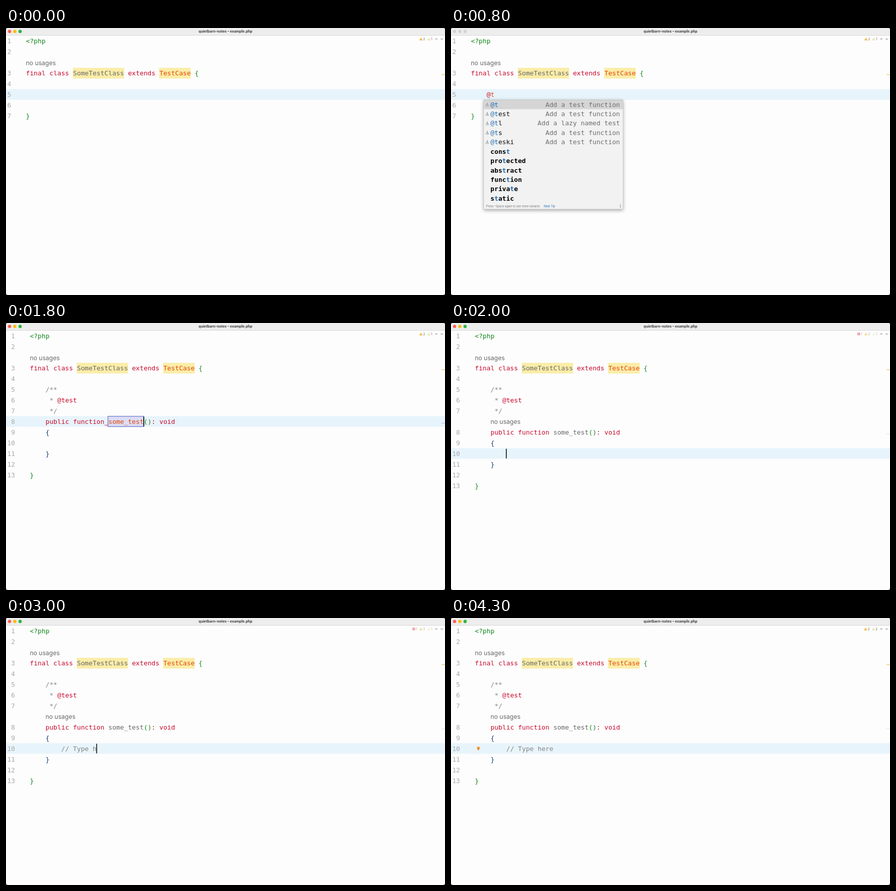
These frames come from a looping animation (860x524 px, 4.5 s). An HTML page with a canvas:

```html
<!DOCTYPE html>
<html lang="en">
<head>
<meta charset="utf-8">
<title>Editor</title>
<style>
html, body { margin: 0; width: 100%; height: 100%; overflow: hidden; background: #fdfdfd; }
canvas { display: block; width: 860px; height: 524px; }
</style>
</head>
<body>
<canvas id="stage"></canvas>
<script>
const W = 860, H = 524, LOOP = 4500;
const ROW = 20.95, TOP = 15.3, CHAR = 7.69;
const MONO = '"DejaVu Sans Mono", monospace', SANS = 'Inter, sans-serif';
const CODE = '12.78px ' + MONO, CODE_BOLD = 'bold ' + CODE, HINT = '12px ' + SANS;
const RED = '#c70a2c', ORANGE = '#e24808', GREEN = '#11871b', NAVY = '#113a78',
  GRAY = '#686868', COMMENT = '#858585', BLUE = '#1d6cb4', NUMBER = '#a9a9ac';

const canvas = document.getElementById('stage');
const ratio = window.devicePixelRatio || 1;
canvas.width = W * ratio;
canvas.height = H * ratio;
const ctx = canvas.getContext('2d');
ctx.scale(ratio, ratio);

const rowTop = row => TOP + row * ROW;

function rect(x, y, w, h, color) {
  ctx.fillStyle = color;
  ctx.fillRect(x, y, w, h);
}

function disc(x, y, r, color) {
  ctx.fillStyle = color;
  ctx.beginPath();
  ctx.arc(x, y, r, 0, 7);
  ctx.fill();
}

function line(points, color, width = 1) {
  ctx.strokeStyle = color;
  ctx.lineWidth = width;
  ctx.beginPath();
  points.forEach(([x, y]) => ctx.lineTo(x, y));
  ctx.stroke();
}

function text(str, x, y, color, font, align = 'left') {
  ctx.font = font;
  ctx.fillStyle = color;
  ctx.textAlign = align;
  ctx.fillText(str, x, y);
}

// Tokens alternate text and colour.
function code(row, x, ...tokens) {
  for (let i = 0; i < tokens.length; i += 2) {
    text(tokens[i], x, rowTop(row) + 15.1, tokens[i + 1], CODE);
    x += tokens[i].length * CHAR;
  }
}

function caret(x, row) {
  rect(x - 0.6, rowTop(row) + 1, 1.5, ROW - 2, '#000');
}

function titleBar(focused) {
  rect(0, 0, W, 14, '#ededed');
  rect(0, 14, W, 0.8, '#d3d3d3');
  ['#fe5f57', '#fdb912', '#29b43c'].forEach((color, i) =>
    disc(7 + i * 10.3, 6.7, 3.2, focused ? color : '#d3d3d3'));
  text('quietbarn-notes – example.php', W / 2, 9.1, '#3c3c3c', 'bold 6.9px ' + SANS, 'center');
}

function warning(x, count, color) {
  ctx.fillStyle = color;
  ctx.beginPath();
  ctx.moveTo(x, 24.3);
  ctx.lineTo(x + 3.3, 18.5);
  ctx.lineTo(x + 6.6, 24.3);
  ctx.fill();
  rect(x + 3, 20.5, 0.7, 2, '#fff');
  text(count, x + 7.6, 23.8, '#666', '6px ' + SANS);
}

function inspections(state) {
  ctx.globalAlpha = state === 'error' ? 0.5 : 1;
  if (state === 'error') {
    disc(798.8, 21.4, 3, '#dc5261');
    rect(798.4, 19.7, 0.8, 2.4, '#fff');
    text('1', 803, 23.8, '#666', '6px ' + SANS);
  }
  const shift = state === 'done' ? -0.8 : 0;
  warning(809.6 + shift, '2', '#edb83b');
  warning(825 + shift, state === 'done' ? '2' : '1', '#e9e3b4');
  ctx.globalAlpha = 1;
  line([[841, 22.6], [843, 20.4], [845, 22.6]], '#555', 0.9);
  line([[851.8, 20.6], [853.8, 22.8], [855.8, 20.6]], '#555', 0.9);
}

function classHeader(x) {
  rect(x + 12 * CHAR - 0.4, rowTop(3), 13 * CHAR + 0.6, ROW, '#fbeda8');
  rect(x + 34 * CHAR - 0.4, rowTop(3), 8 * CHAR + 0.4, ROW, '#fbeda8');
  code(0, x, '<?php', GREEN);
  text('no usages', x, rowTop(2) + 57 - 0.1 - 41.9 + 0.1 + 0.2, GRAY, HINT);
  code(3, x, 'final class ', RED, 'SomeTestClass', GRAY, ' extends ', RED,
    'TestCase', ORANGE, ' {', GREEN);
  rect(853, 91, 7, 1.1, '#e6c64f');
}

function lineNumbers(count, right, hintRows) {
  let row = 0;
  for (let n = 1; n <= count; n++, row++) {
    while (hintRows.includes(row)) row++;
    text(n, right, rowTop(row) + 15.1, NUMBER, CODE, 'right');
  }
}

function currentRow(row) {
  rect(0, rowTop(row) - 0.2, W, ROW, '#e8f4fb');
}

function stampIcon(y) {
  line([[71, y - 3.4], [71, y + 0.3]], '#999', 1.6);
  line([[68, y + 0.6], [74, y + 0.6]], '#999', 1);
  line([[67.8, y + 2.8], [74.2, y + 2.8]], '#999', 1);
}

const TEMPLATES = [['@t', 'Add a test function'], ['@test', 'Add a test function'],
  ['@tl', 'Add a lazy named test'], ['@ts', 'Add a test function'], ['@teski', 'Add a test function']];
const KEYWORDS = ['const', 'protected', 'abstract', 'function', 'private', 'static'];

function popup() {
  ctx.save();
  ctx.shadowColor = 'rgba(0,0,0,0.35)';
  ctx.shadowBlur = 7 * ratio;
  ctx.shadowOffsetY = 2 * ratio;
  rect(64, 141, 273, 214.5, '#f2f2f2');
  ctx.restore();
  rect(64, 141, 273, 18.3, '#d5d5d5');
  ctx.strokeStyle = '#c2c2c2';
  ctx.lineWidth = 0.7;
  ctx.strokeRect(64, 141, 273, 214.5);

  const baseline = i => 154.6 + i * 18.43;
  TEMPLATES.forEach(([name, note], i) => {
    const y = baseline(i);
    stampIcon(y - 4.3);
    text(name.slice(0, 2), 77.3, y, BLUE, CODE);
    text(name.slice(2), 77.3 + 2 * CHAR, y, '#111', CODE);
    text(note, 331, y, '#6e6e6e', CODE, 'right');
  });
  KEYWORDS.forEach((word, i) => {
    const y = baseline(i + TEMPLATES.length);
    const hit = word === 'const' ? 4 : word.indexOf('t');
    [...word].forEach((letter, k) =>
      text(letter, 77.3 + k * CHAR, y, k === hit ? BLUE : '#000', CODE_BOLD));
  });
  text('Press ^Space again to see more variants', 69, 351.6, '#777', '5.5px ' + SANS);
  text('Next Tip', 182, 351.6, BLUE, '5.5px ' + SANS);
  [347, 349.5, 352].forEach(y => disc(331.8, y, 0.7, '#555'));
}

function shortcutScene(t) {
  const x = 39;
  currentRow(5);
  classHeader(x);
  lineNumbers(7, 10.2, [2]);
  code(7, x, '}', GREEN);
  const typed = t < 500 ? 0 : t < 600 ? 1 : 2;
  const start = x + 4 * CHAR;
  if (typed > 0) code(5, start, '@', RED);
  if (typed > 1) code(5, start + CHAR, 't', ORANGE);
  if (t >= 300 && t < 700) caret(start + typed * CHAR, 5);
  inspections('start');
  if (t >= 700) popup();
}

function methodScene(t) {
  const x = 46.7, indent = x + 4 * CHAR;
  const naming = t < 1900;
  const hint = t >= 2000 ? 1 : 0;
  const head = 8 + hint, body = head + 2;
  const letters = t < 1100 ? 0 : Math.min(9, Math.floor(t / 100) - 9);
  const name = 'some_test'.slice(0, letters);
  const nameX = indent + 16 * CHAR;

  currentRow(naming ? head : body);
  classHeader(x);
  lineNumbers(13, 17.8, hint ? [2, 8] : [2]);
  code(5, indent, '/**', COMMENT);
  code(6, indent, ' * ', COMMENT, '@test', RED);
  code(7, indent, ' */', COMMENT);
  if (hint) text('no usages', indent, rowTop(8) + 15.3, GRAY, HINT);

  if (naming) {
    const width = letters * CHAR + 1;
    rect(nameX - 0.5, rowTop(head) + 0.2, width, ROW - 0.8, '#dcddf6');
    ctx.strokeStyle = '#4a5fc4';
    ctx.lineWidth = 1;
    ctx.strokeRect(nameX - 0.8, rowTop(head) + 0.2, width, ROW - 0.8);
    const wave = [0, 1, 2, 3, 4].map(i => [nameX - 7.5 + i * 1.8, rowTop(head) + (i % 2 ? 18.6 : 16.6)]);
    line(wave, '#d9192b', 0.9);
  }
  code(head, indent, 'public function ', RED, name, naming ? ORANGE : GRAY,
    '()', GREEN, ': void', RED);
  if (naming) caret(nameX + letters * CHAR, head);
  code(head + 1, indent, '{', NAVY);
  code(head + 3, indent, '}', NAVY);
  code(head + 5, x, '}', GREEN);
  rect(853, 196 + hint * 21, 7, 1, naming ? '#a9c4e8' : '#e2e2e2');
  inspections(t >= 3600 ? 'done' : hint ? 'error' : 'start');
  if (!naming) comment(t, body, indent + 4 * CHAR);
}

function comment(t, row, x) {
  const count = t >= 3200 ? 12 : Math.max(0, Math.floor(t / 100) - 21);
  code(row, x, '// Type here'.slice(0, count), COMMENT);
  if (t < 3600 || (t >= 3900 && t < 4200)) caret(x + count * CHAR, row);
  if (t >= 3800) {
    disc(53.6, 255.2, 2.8, '#f0932b');
    rect(52.4, 257.6, 2.4, 2, '#b98343');
  }
}

function draw(now) {
  const t = now % LOOP;
  rect(0, 0, W, H, '#23303c');
  ctx.save();
  ctx.beginPath();
  ctx.roundRect(0, 0, W, H, 4);
  ctx.clip();
  rect(0, 0, W, H, '#fdfdfd');
  if (t < 1000) shortcutScene(t); else methodScene(t);
  titleBar(t < 700 || t >= 1000);
  ctx.restore();
}

const begin = performance.now();
function tick() {
  draw(performance.now() - begin);
  requestAnimationFrame(tick);
}
tick();
</script>
</body>
</html>
```
